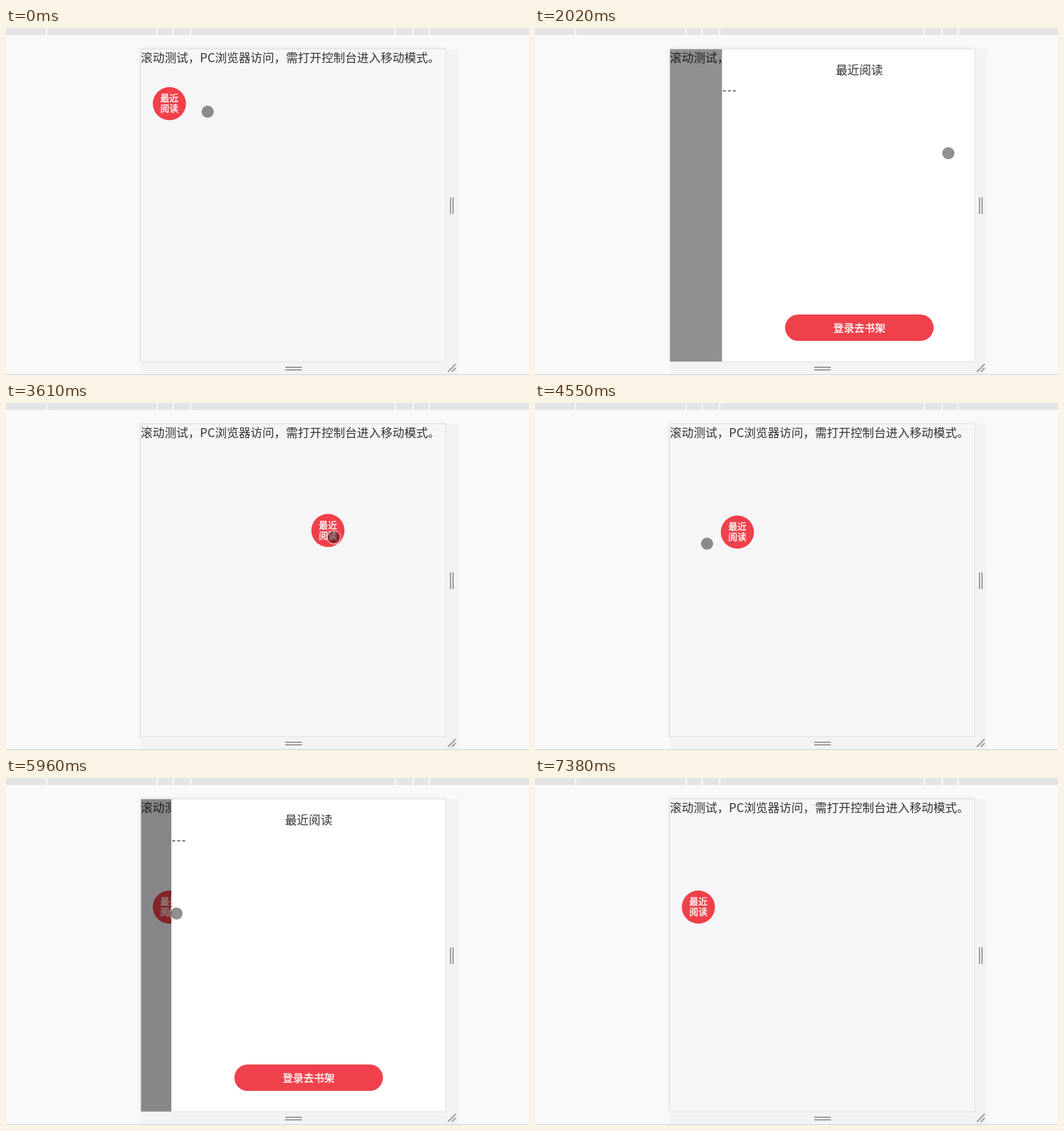
These frames come from a looping animation (813x539 px, 7.94 s). An HTML page:

```html
<!DOCTYPE html>
<html lang="zh-CN">
<head>
<meta charset="utf-8">
<title>Floating button and drawer</title>
<style>
html, body { margin: 0; width: 100%; height: 100%; overflow: hidden; background: #f9f9f9; }
svg { display: block; width: 813px; height: 539px; }
text { font-family: "Noto Sans CJK SC", "Noto Sans CJK", "Noto Sans", sans-serif; font-size: 18.4px; font-weight: 300; fill: #333; }
.mid { text-anchor: middle; }
.chip, .action { fill: #fff; stroke: #fff; stroke-width: .35; font-weight: 400; }
.chip { font-size: 14.2px; }
.action { font-size: 16.2px; }
.dash { letter-spacing: 1.3px; }
.grip { stroke: #999; stroke-width: 2; fill: none; }
</style>
</head>
<body>
<svg viewBox="0 0 813 539" xmlns="http://www.w3.org/2000/svg">
  <defs>
    <clipPath id="screen"><rect x="210" y="33" width="473" height="485"/></clipPath>
    <filter id="soft" x="-5%" y="-5%" width="110%" height="110%"><feGaussianBlur stdDeviation="3"/></filter>
  </defs>
  <rect width="813" height="539" fill="#f9f9f9"/>
  <rect width="813" height="11" fill="#e4e4e4"/>
  <path d="M63 0v11M235 0v11M260 0v11M287 0v11M605 0v11M633 0v11M658 0v11" stroke="#f9f9f9" stroke-width="2"/>
  <rect x="209" y="32" width="475" height="487" fill="#000" opacity=".09" filter="url(#soft)"/>
  <path d="M684 33h19v505H210v-19h474z" fill="#f3f3f3"/>
  <rect y="538" width="813" height="1" fill="#ccc"/>
  <path class="grip" d="M691 263v26M695 263v26M434 527h26M434 531h26M687 534l12-12M693 534l6-6"/>
  <rect x="209.5" y="32.5" width="474" height="486" fill="#f6f6f9" stroke="#e0e0e2"/>
  <g clip-path="url(#screen)">
    <text x="209.6" y="53">滚动测试，PC浏览器访问，需打开控制台进入移动模式。</text>
    <g id="ball">
      <circle r="25.8" fill="#ef414b"/>
      <text class="mid chip" y="-3.4">最近</text>
      <text class="mid chip" y="12.8">阅读</text>
    </g>
    <rect id="shade" x="210" y="33" width="473" height="485"/>
    <g id="drawer">
      <rect y="33" width="426" height="485" fill="#fff"/>
      <text class="mid" x="213.5" y="71.5">最近阅读</text>
      <text class="dash" x="0.5" y="103">---</text>
      <rect x="98" y="445" width="231" height="41" rx="20.5" fill="#ef414b"/>
      <text class="mid action" x="213.5" y="472">登录去书架</text>
    </g>
    <g id="touch">
      <circle r="9.6" opacity=".435"/>
      <circle r="10.4" fill="none" stroke="#fff" stroke-opacity=".46" stroke-width="1.7"/>
    </g>
  </g>
</svg>
<script>
const LOOP = 7940;
const BEAT = 131.7;
const SLIDE = 300 / BEAT;
const DRAWER = 426, RIGHT = 683;

// When the drawer starts to open and to close.
const visits = [[13.7, 20.1], [42.8, 49.4]];

// Places where the finger rests: arrival, departure, x, y.
const rests = [
  [0, 0, 313.5, 130],
  [1, 1, 263, 128],
  [9, 9, 630, 206],
  [13, 16, 642.5, 194.5],
  [19, 22, 227.5, 276.5],
  [26, 26, 648, 206],
  [31, 39, 267.5, 218.5],
  [41, 45, 265, 210.5],
  [49, 50, 234.5, 272.5],
  [56, 57, 760, 530]
];

const [ball, shade, drawer, touch] =
  ["ball", "shade", "drawer", "touch"].map(id => document.getElementById(id));

const phase = (n, from, to) => Math.min(1, Math.max(0, (n - from) / (to - from)));
const easeOut = (k, power) => 1 - (1 - k) ** power;
const mix = (a, b, k) => a + (b - a) * k;

// Drag right, glide to the edge, drag left, rebound once from the left edge.
function ballAt(n) {
  const drag = phase(n, 1, 7);
  const x = 254
    + 302 * easeOut(drag, 3)
    + 83 * easeOut(phase(n, 7, 11), 2)
    - 385 * easeOut(phase(n, 26, 31), 2)
    + 71 * Math.sin(Math.PI * phase(n, 31, 39)) ** 2;
  const y = 117.5 + 78 * easeOut(drag, 6) + 5 * phase(n, 26, 28);
  return [x, y];
}

function touchAt(n) {
  const dragging = (n >= 1 && n < 9) || (n >= 26 && n < 30);
  if (dragging) {
    const [x, y] = ballAt(n);
    return [x + 9, y + 10.5];
  }
  const i = Math.max(0, rests.findLastIndex(r => r[0] <= n));
  const [, leave, x, y] = rests[i];
  const [arrive, , toX, toY] = rests[i + 1] || rests[i];
  const k = phase(n, leave, Math.max(arrive, leave + 0.01));
  return [mix(x, toX, k), mix(y, toY, k)];
}

function drawerAt(n) {
  let open = 0, dim = 0;
  for (const [start, end] of visits) {
    const rise = easeOut(phase(n, start, start + SLIDE), 3);
    const left = 1 - phase(n, end, end + SLIDE);
    open += rise * left ** 3;
    dim += rise * left ** 0.8;
  }
  return [RIGHT - DRAWER * open, 0.45 * dim];
}

function place(node, x, y) {
  node.setAttribute("transform", `translate(${x.toFixed(2)} ${y.toFixed(2)})`);
}

function draw(time) {
  const n = Math.floor(time / BEAT);
  const [left, alpha] = drawerAt(n);
  place(ball, ...ballAt(n));
  place(touch, ...touchAt(n));
  place(drawer, left, 0);
  shade.setAttribute("opacity", alpha);
}

const start = performance.now();
function tick() {
  draw((performance.now() - start) % LOOP);
  requestAnimationFrame(tick);
}
tick();
</script>
</body>
</html>
```
